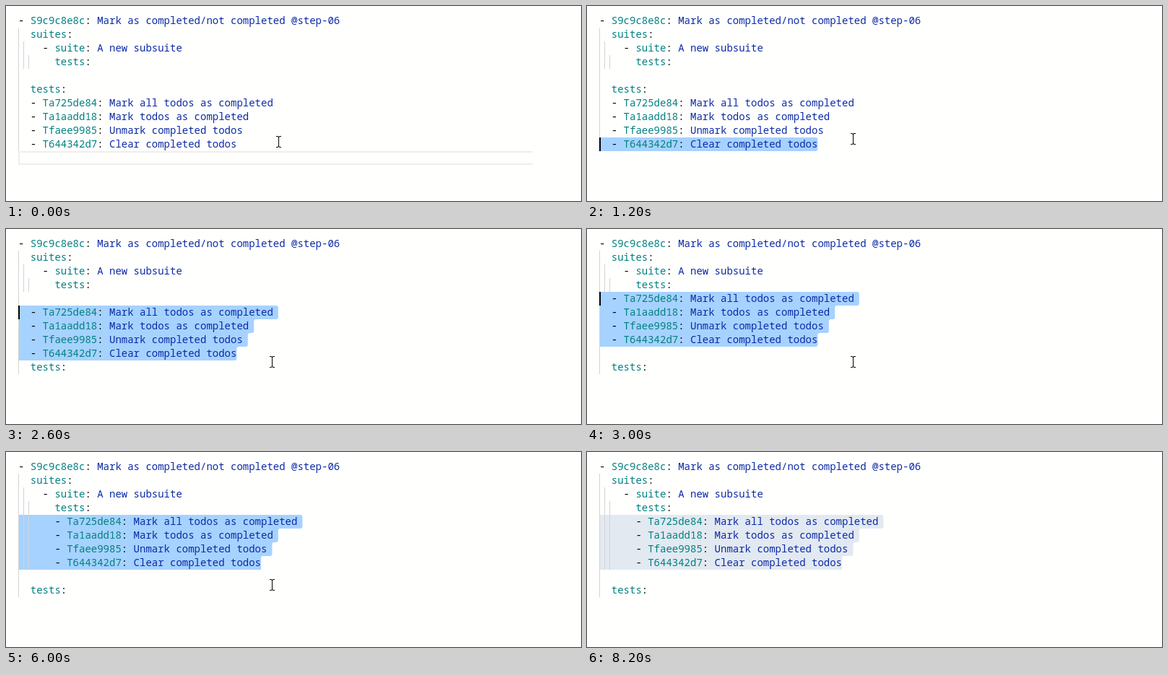
An HTML page for the animation above (8.4 s loop, 796x270 px).

```html
<!DOCTYPE html>
<html lang="en">
<head>
<meta charset="utf-8">
<title>Moving tests into a subsuite</title>
<style>
  html, body { margin: 0; width: 100%; height: 100%; overflow: hidden; background: #fffffe; }
  svg { display: block; }
  text { font: 500 14px "Noto Sans Mono", "DejaVu Sans Mono", monospace; fill: #000; }
  .key { fill: #008080; }
  .value { fill: #0c2aa6; }
  .guide { fill: #d3d3d3; }
  .guide.active { fill: #939393; }
  #words { fill: #575757; fill-opacity: .25; }
  #line { fill: none; stroke: #eee; stroke-width: 2; }
</style>
</head>
<body>
<svg id="stage" width="796" height="270" viewBox="0 0 796 270">
  <path id="line"/>
  <path id="selection"/>
  <path id="words"/>
  <g id="guides"></g>
  <g id="code"></g>
  <rect id="caret" width="2" height="19"/>
  <g id="mouse" fill="none" stroke-linecap="square">
    <path d="M-2.5-7.5H-1L.5-6.5 2-7.5H3.5M.5-6.5V6.5M-2.5 7.5H-1L.5 6.5 2 7.5H3.5" stroke="#fff" stroke-width="2.6"/>
    <path d="M-2.5-7.5H-1L.5-6.5 2-7.5H3.5M.5-6.5V6.5M-2.5 7.5H-1L.5 6.5 2 7.5H3.5" stroke="#111" stroke-width="1.1"/>
  </g>
</svg>
<script>
const LOOP = 8400, LEFT = 17, TOP = 11, CHAR = 8.4, ROW = 19, RADIUS = 3, NEWLINE = 7;
const $ = id => document.getElementById(id);
const colX = col => LEFT + col * CHAR;
const rowY = row => TOP + row * ROW;
const within = (t, from, to) => t >= from && t < to;

// Latest value of a list of [start time, value] steps
const at = (steps, t) => steps.filter(([start]) => start <= t).pop()[1];

function add(parent, tag, attrs, text = '') {
  const node = document.createElementNS('http://www.w3.org/2000/svg', tag);
  for (const name in attrs) node.setAttribute(name, attrs[name]);
  node.textContent = text;
  return parent.appendChild(node);
}

function addLine(row, indent, dash, key, value) {
  const line = add($('code'), 'text', {});
  const start = indent + (dash ? 2 : 0);
  const part = (col, text, cls) => add(line, 'tspan', { x: colX(col), y: 14, class: cls }, text);
  if (dash) part(indent, '-', '');
  part(start, key, 'key');
  part(start + key.length, ':', '');
  if (value) part(start + key.length + 2, value, 'value');
  place(line, row, 0);
  return line;
}

function place(line, row, indent) {
  line.setAttribute('transform', `translate(${indent * CHAR} ${rowY(row)})`);
}

addLine(0, 0, true, 'S9c9c8e8c', 'Mark as completed/not completed @step-06');
addLine(1, 2, false, 'suites');
addLine(2, 4, true, 'suite', 'A new subsuite');
addLine(3, 6, false, 'tests');
const testsLine = addLine(5, 2, false, 'tests');

const todos = [
  ['Ta725de84', 'Mark all todos as completed'],
  ['Ta1aadd18', 'Mark todos as completed'],
  ['Tfaee9985', 'Unmark completed todos'],
  ['T644342d7', 'Clear completed todos'],
].map(([key, value], i) => ({
  line: addLine(6 + i, 2, true, key, value),
  end: 15 + value.length,
  word: 15 + value.indexOf('todos'),
}));

const guides = [0, 1, 2].map(i => add($('guides'), 'rect', {
  class: 'guide', x: LEFT + 7 * i, y: rowY(1 + i), width: 1, height: (i ? 3 - i : 9) * ROW,
}));

$('words').setAttribute('d', todos.map(({ word }, i) =>
  `M${colX(word)} ${rowY(6 + i)}h${5 * CHAR}v${ROW}h${-5 * CHAR}z`).join(''));

const groupRow = [[0, 6], [2600, 5], [3000, 4]];
const groupIndent = [[0, 0], [3900, 2], [4300, 4]];
const firstSelected = [[0, 4], [1100, 3], [1700, 2], [1900, 1], [2000, 0]];
const caretOn = [[400, 900], [1100, 4800], [5300, 6000], [6500, 7000], [7500, 8000]];

// Rounded outline whose rows get shorter downwards
function selectionPath(t, first, top, indent) {
  if (first > 3) return '';
  const left = within(t, 1100, 1200) ? colX(2) : LEFT, r = RADIUS;
  const rights = todos.slice(first).map((todo, i, rest) =>
    colX(todo.end + indent) + (i < rest.length - 1 ? NEWLINE : 0));
  let d = `M${left} ${top}H${rights[0] - r}`;
  rights.forEach((right, i) => {
    const bottom = top + (i + 1) * ROW, next = rights[i + 1];
    d += `q${r} 0 ${r} ${r}V${bottom - r}`;
    if (next) d += `q0 ${r} ${-r} ${r}H${next + r}q${-r} 0 ${-r} ${r}V${bottom + r}h${-r}m${r} 0`.replace(/h.*$/, '');
    else d += t < 3500 ? `q0 ${r} ${-r} ${r}` : `V${bottom}`;
    if (next) d = d + `V${bottom + ROW - r}`;
  });
  return outline(left, top, rights, t < 3500 ? r : 0);
}

function outline(left, top, rights, lastRadius) {
  const r = RADIUS;
  let d = `M${left} ${top}H${rights[0] - r}q${r} 0 ${r} ${r}`;
  rights.forEach((right, i) => {
    const bottom = top + (i + 1) * ROW, next = rights[i + 1];
    d += next
      ? `V${bottom - r}q0 ${r} ${-r} ${r}H${next + r}q${-r} 0 ${-r} ${r}`
      : `V${bottom - lastRadius}q0 ${lastRadius} ${-lastRadius} ${lastRadius}`;
  });
  return d + `H${left}z`;
}

function mousePosition(t) {
  if (t < 400) {
    const p = Math.min(1, Math.max(0, (t - 100) / 200));
    return [377 - 9 * p, 188 - 4 * p];
  }
  const p = Math.max(0, (t - 6400) / 700);
  return [368 - 12 * p * p, 184 - 200 * p * p];
}

function render(t) {
  const row = at(groupRow, t), indent = at(groupIndent, t), first = at(firstSelected, t);
  todos.forEach(({ line }, i) => place(line, row + i, indent));
  place(testsLine, row === 6 ? 5 : 9, 0);

  $('selection').setAttribute('d', selectionPath(t, first, rowY(row + first), indent));
  $('selection').setAttribute('fill', t < 8200 ? '#a6d2ff' : '#e2e9f1');

  guides[0].classList.toggle('active', within(t, 400, 1100));
  guides[1].setAttribute('height', (indent ? 6 : 2) * ROW);
  guides[2].setAttribute('height', (indent > 2 ? 5 : 1) * ROW);

  const lineY = rowY(t < 400 ? 10 : 9);
  $('line').setAttribute('d', t < 1100 ? `M729 ${lineY + 1}H${LEFT + 1}v${ROW - 2}H729` : '');
  $('words').style.display = within(t, 600, 1100) ? '' : 'none';

  const caretX = t < 1100 ? 318 : t < 1200 ? 34 : LEFT;
  $('caret').setAttribute('x', caretX);
  $('caret').setAttribute('y', rowY(first > 3 ? 9 : row + first));
  $('caret').style.display = caretOn.some(([on, off]) => within(t, on, off)) ? '' : 'none';

  $('mouse').setAttribute('transform', `translate(${mousePosition(t).map(Math.round).join(' ')})`);
  $('mouse').style.display = t < 7100 ? '' : 'none';
}

const start = performance.now();
function tick() {
  const t = (performance.now() - start) % LOOP;
  render(Math.floor(t / 100) * 100);
  requestAnimationFrame(tick);
}
tick();
</script>
</body>
</html>
```
